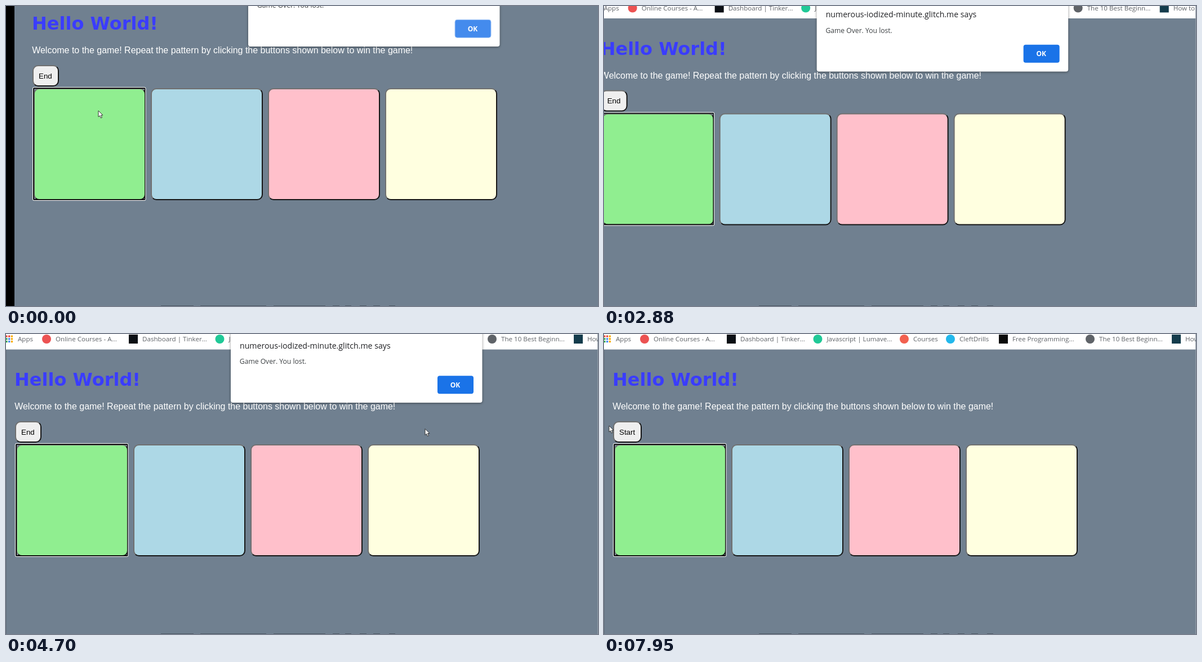
An HTML page for the animation above (8 s loop, 1051 px wide and 533 px high).

```html
<!DOCTYPE html>
<html lang="en">
<head>
<meta charset="utf-8">
<title>Pattern game</title>
<style>
  html, body { margin: 0; width: 100%; height: 100%; overflow: hidden; background: #000; }
  svg { display: block; width: 1051px; height: 533px; }
  text { white-space: pre; }
  .ui { font-family: "Open Sans", "Noto Sans", sans-serif; }
  .arial { font-family: "Liberation Sans", Arial, sans-serif; }
  .marks { font-size: 11.6px; fill: #5f6368; }
  .title { font: bold 32px "DejaVu Sans", Verdana, sans-serif; fill: #3a3cff; }
  .tile { stroke: url(#outset); stroke-width: 2; }
  .dialog { filter: drop-shadow(0 1.5px 2px rgba(0, 0, 0, .45)); }
</style>
</head>
<body>
<svg viewBox="0 0 1051 533">
  <defs>
    <linearGradient id="outset" x1="0" y1="0" x2="1" y2="1">
      <stop offset=".5" stop-color="#707070"/>
      <stop offset=".5" stop-color="#151515"/>
    </linearGradient>
  </defs>

  <g id="scene">
    <rect x="-16" y="-100" width="1200" height="800" fill="#708090"/>

    <g id="bar" class="ui marks">
      <rect x="-16" y="-60" width="1200" height="87.5" fill="#fff"/>
      <text x="21" y="13.4">Apps</text>
    </g>

    <text class="title" x="15" y="92">Hello World!</text>
    <text class="arial" x="15.2" y="134.2" font-size="15.97" fill="#fff">Welcome to the game! Repeat the pattern by clicking the buttons shown below to win the game!</text>

    <rect id="button" class="tile" x="17" y="156" width="45" height="36" rx="9" fill="#efefef"/>
    <text id="label" class="arial" x="27" y="178.5" font-size="13.33">End</text>

    <g id="tiles"></g>
    <rect x="18" y="196" width="198" height="198" rx="1.5" fill="none" stroke="#101010" stroke-width="2"/>
    <rect x="16.5" y="194.5" width="200.5" height="201" rx="2" fill="none" stroke="#fff"/>

    <g id="dialog" class="ui">
      <rect class="dialog" x="399" y="-60" width="446.5" height="182" rx="4" fill="#fff"/>
      <text x="415" y="25.5" font-size="14.15" fill="#202124">numerous-iodized-minute.glitch.me says</text>
      <text x="414.8" y="53" font-size="12.15" fill="#3c4043">Game Over. You lost.</text>
      <rect id="ok" x="766" y="74.3" width="64" height="32" rx="4"/>
      <text x="797.5" y="94.7" font-size="12" font-weight="700" fill="#fff" text-anchor="middle">OK</text>
    </g>
  </g>

  <path d="M275 532.5h58m12 0h117m13 0h92m13 0h12m10 0h11m15 0h12m12 0h12m16 0h11" stroke="#4c5763"/>
  <path id="rightEdge" d="M1050.5 0V533" stroke="#8e9aa5"/>
  <path id="leftEdge" d="M.5 28V533" stroke="#5f6d7a"/>
  <path id="cursor" d="M0 0V11L2.6 8.8L4.4 13L6.4 12.2L4.6 8H8Z" fill="#fff" stroke="#222" stroke-width=".9"/>
</svg>

<script>
const LOOP = 8000;
const TICK = 82; // usual gap between two steps of a movement, in ms
const $ = id => document.getElementById(id);

function add(parent, tag, attrs, text = '') {
  const el = document.createElementNS('http://www.w3.org/2000/svg', tag);
  for (const key in attrs) el.setAttribute(key, attrs[key]);
  el.textContent = text;
  $(parent).append(el);
}

function square(parent, x, y, size, fill, more = {}) {
  add(parent, 'rect', { x, y, width: size, height: size, fill, ...more });
}

['lightgreen', 'lightblue', 'pink', 'lightyellow'].forEach((fill, i) =>
  square('tiles', 19 + 208 * i, 197, 197, fill, { class: 'tile', rx: 9 }));

const [red, amber, green, blue] = ['#ea4335', '#f9ab00', '#34a853', '#4285f4'];
[red, red, amber, green, blue, amber, green, blue, amber].forEach((fill, i) =>
  square('bar', -.6 + i % 3 * 4.7, 2.5 + Math.floor(i / 3) * 4.7, 3.2, fill));

// Each bookmark has its icon centred 16px left of its text.
function bookmark(x, text, fill, corner = 8) {
  square('bar', x - 24, 1, 16, fill, { rx: corner });
  add('bar', 'text', { x, y: 13.4 }, text);
}

bookmark(88, 'Online Courses - A...', '#ec5252');
bookmark(242, 'Dashboard | Tinker...', '#0b0f14', 0);
bookmark(395.5, 'Javascript | Lumave...', '#20c997');
bookmark(549, 'Courses', '#f2604f');
bookmark(631, 'CleftDrills', '#22b8ec');
bookmark(725, 'Free Programming...', '#0a0a0a', 0);
bookmark(879, 'The 10 Best Beginn...', '#5f6368');
bookmark(1032, 'How to Code...', '#143c4c', 0);

// A path is a start point and legs; each leg steps evenly to its end point.
const leg = (from, to, x, y) => ({ from, to, x, y });

const pan = [{ x: 31, y: -50 },
  leg(1450, 1710, 9, -18),
  leg(2000, 2240, -30, -6.5),
  leg(2880, 3070, -4, -3.5),
  leg(3350, 3710, 0, 0),
];

const pointer = [{ x: 164, y: 186 },
  leg(160, 710, 1087, -28),
  leg(4210, 4210, 289, 346),
  leg(4290, 4696, 744, 168.5),
  leg(4780, 4940, 794, 112),
  leg(5380, 5500, 791.5, 106.5),
  leg(6290, 6552, 423, 140),
  leg(6640, 6990, 785.5, 86),
  leg(7780, 7950, 9, 163),
];

function place(el, [start, ...legs], t) {
  let { x, y } = start;
  for (const l of legs) {
    if (t < l.from) break;
    const gaps = Math.round((l.to - l.from) / TICK);
    const step = gaps && Math.min(gaps, Math.floor((t - l.from) / (l.to - l.from) * gaps));
    const done = (step + 1) / (gaps + 1);
    x += (l.x - x) * done;
    y += (l.y - y) * done;
  }
  el.setAttribute('transform', `translate(${x} ${y})`);
}

const show = (el, on) => el.setAttribute('visibility', on ? 'visible' : 'hidden');

function draw() {
  const t = performance.now() % LOOP;
  const hover = t < 320 || t >= 5850;
  const closed = t >= 7400;

  place($('scene'), pan, t);
  place($('cursor'), pointer, t);
  $('ok').setAttribute('fill', hover ? '#448bed' : '#1a73e8');
  $('ok').setAttribute('stroke', hover ? '#a9cbf7' : 'none');
  show($('dialog'), !closed);
  $('label').textContent = closed ? 'Start' : 'End';
  $('button').setAttribute('width', closed ? 49 : 45);
  show($('rightEdge'), t >= 2240);
  show($('leftEdge'), t >= 3710);
  requestAnimationFrame(draw);
}
draw();
</script>
</body>
</html>
```
